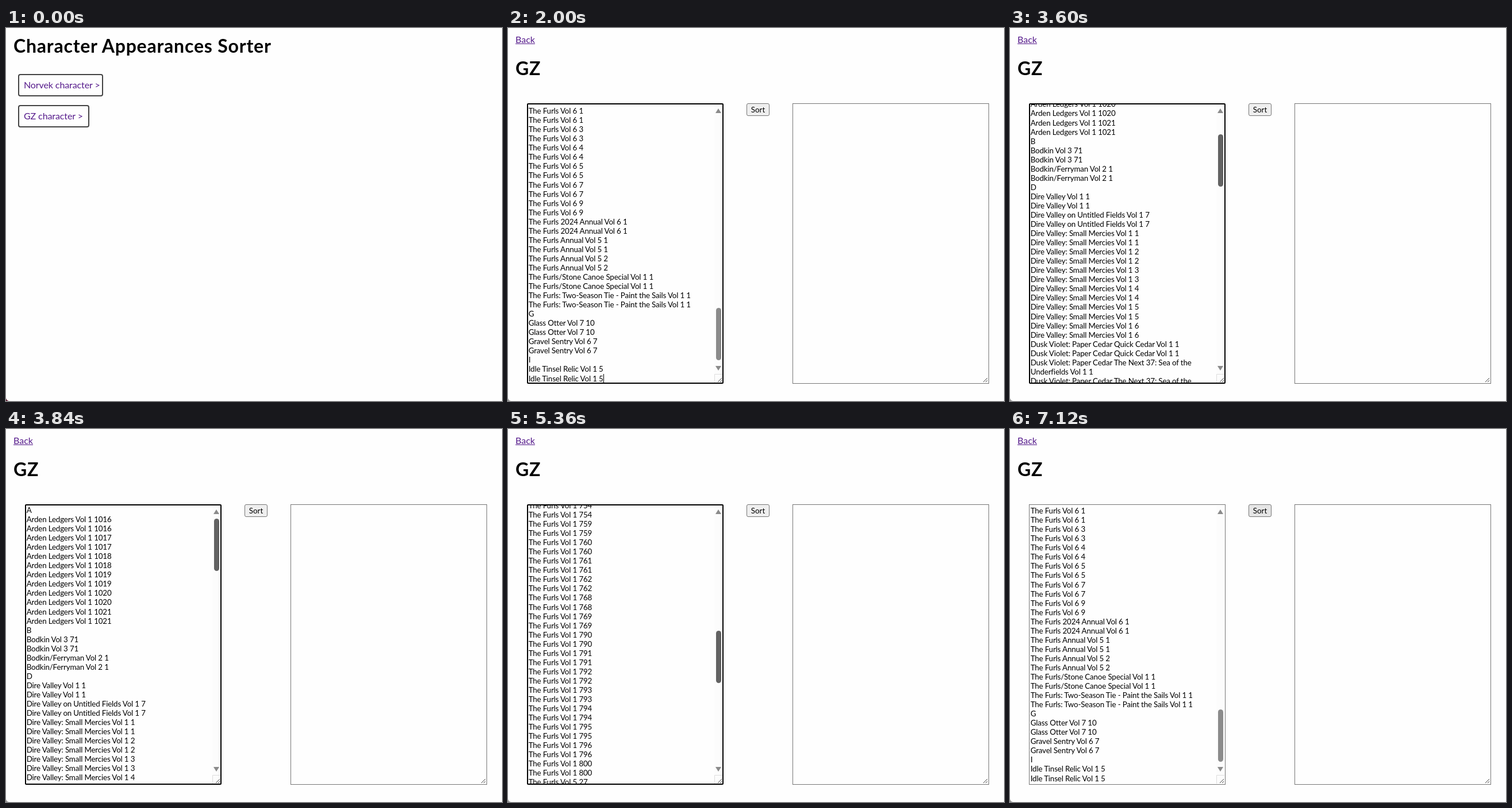
Write an HTML page that moves like this. It is 863 by 649 pixels and loops after 8 s.

```html
<!DOCTYPE html>
<html lang="en">
<head>
<meta charset="utf-8">
<title>Character Appearances Sorter</title>
<style>
  html, body { margin: 0; width: 100%; height: 100%; overflow: hidden; background: #fefefe; }
  body { position: relative; font: 16px Lato, sans-serif; color: #000; }
  div, h1, svg { position: absolute; box-sizing: border-box; margin: 0; white-space: pre; }
  svg { left: 0; top: 0; }
  h1 { left: 13px; font: bold 32px/40px Lato, sans-serif; letter-spacing: .8px; }
  .link { left: 21px; height: 39px; border: 2px solid #444; border-radius: 4px; padding-left: 8px; line-height: 34px; letter-spacing: -.1px; color: #551a8b; }
  .area { top: 131px; width: 342px; height: 488px; border: 1px solid #767676; }
  #left.focus { border: 2px solid #000; border-radius: 2px; }
  #clip { left: 35px; top: 133px; width: 324px; height: 484px; overflow: hidden; }
  #text { left: .7px; top: 0; font-size: 13.33px; line-height: 16.04px; letter-spacing: -.15px; }
  #caret { display: inline-block; width: 1px; height: 16px; margin-right: -1px; vertical-align: top; background: #000; }
  #sort { left: 415px; top: 131px; width: 40px; height: 22px; border: 1px solid #767676; border-radius: 3px; font-size: 13.33px; line-height: 20px; text-align: center; }
  #bar { left: 359px; top: 133px; width: 14px; height: 484px; background: #fcfcfc; }
  #thumb { left: 3px; width: 9px; height: 91px; border-radius: 4.5px; }
  #corner { left: 0; bottom: 0; width: 6px; height: 6px; }
</style>
</head>
<body>
<div id="home">
  <h1 style="top:11px">Character Appearances Sorter</h1>
  <div class="link" style="top:80px;width:148px">Norvek character &gt;</div>
  <div class="link" id="pick" style="top:134px;width:124px">GZ character &gt;</div>
</div>
<div id="page">
  <div style="left:13px;top:10px;line-height:20px;color:#551a8b;text-decoration:underline">Back</div>
  <h1 style="top:50px">GZ</h1>
  <div class="area" id="left" style="left:33px"></div>
  <div class="area" style="left:495px"></div>
  <div id="clip"><div id="text"></div></div>
  <div id="bar">
    <svg width="14" height="484" fill="#8b8b8b"><path d="M7 7l5 8H2zM7 463l5-8H2z"/><path d="M.5 484V469.500H14" fill="none" stroke="#ddd"/></svg>
    <div id="thumb"></div>
  </div>
  <svg width="863" height="649" fill="none" stroke="#444"><path id="grip" d="M365 616l7-7m-3 7l3-3"/><path d="M827 616l7-7m-3 7l3-3"/></svg>
  <div id="sort">Sort</div>
</div>
<div id="corner"></div>
<script>
const $ = id => document.getElementById(id);
const twice = s => [s, s];
const issues = (title, nums) => nums.split(' ').flatMap(n => twice(`${title} ${n}`));
const lines = [
  'A', ...issues('Arden Ledgers Vol 1', '1016 1017 1018 1019 1020 1021'),
  'B', ...issues('Bodkin Vol 3', '71'), ...issues('Bodkin/Ferryman Vol 2', '1'),
  'D', ...issues('Dire Valley Vol 1', '1'), ...issues('Dire Valley on Untitled Fields Vol 1', '7'),
  ...issues('Dire Valley: Small Mercies Vol 1', '1 2 3 4 5 6'),
  ...issues('Dusk Violet: Paper Cedar Quick Cedar Vol 1', '1'),
  ...issues('Dusk Violet: Paper Cedar The Next 37: Sea of the\nUnderfields Vol 1', '1'),
  ...issues('Dusk Violet: Paper Cedar The Next Legends of the GZ\nProvince Vol 1', '1'),
  ...twice('GZ Quarto Compendiums: New Edition'),
  ...issues('GZ Clockmaker Winter Vol 1', '1'),
  ...issues('GZ Tides: A Remembrance Vol 1', '1'),
  ...issues('GZ Bells: Lon Pavic Special Vol 1', '1'),
  ...twice("GZ's Quick Relay Vol 1 2 (Digital)"),
  ...issues('Dusk J for Jory Vol 1', '11'),
  'F', ...issues('FMQP Dire Valley Special Edition Vol 1', '0'),
  ...issues('The Furls Vol 1', '750 752 754 759 760 761 762 768 769 790 791 792 793 794 795 796 800'),
  ...issues('The Furls Vol 5', '27 50 51 57 70 71 74 81'),
  ...issues('The Furls Vol 6', '1 3 4 5 7 9'),
  ...issues('The Furls 2024 Annual Vol 6', '1'), ...issues('The Furls Annual Vol 5', '1 2'),
  ...issues('The Furls/Stone Canoe Special Vol 1', '1'),
  ...issues('The Furls: Two-Season Tie - Paint the Sails Vol 1', '1'),
  'G', ...issues('Glass Otter Vol 7', '10'), ...issues('Gravel Sentry Vol 6', '7'),
  'I', ...issues('Idle Tinsel Relic Vol 1', '5')
].join('\n');

// [time, scroll offset]
const scrollKeys = [[3040, 1762], [3120, 1600], [3280, 720], [3360, 500], [3600, 153], [3840, 0],
  [4880, 0], [4960, 217], [5360, 1035], [5680, 1764]];

function scrollAt(t) {
  const i = scrollKeys.findIndex(k => k[0] > t);
  if (i < 0) return scrollKeys.at(-1)[1];
  if (!i) return scrollKeys[0][1];
  const [t0, a] = scrollKeys[i - 1], [t1, b] = scrollKeys[i];
  return Math.round(a + (b - a) * (t - t0) / (t1 - t0));
}

const show = (el, on) => el.style.visibility = on ? 'inherit' : 'hidden';
const within = (t, a, b) => t >= a && t < b;
let pasted;

function draw(now) {
  const t = Math.floor(now % 8000 / 80) * 80;
  const filled = t >= 2000, focus = within(t, 1520, 6960);
  show($('home'), t < 960);
  show($('page'), t >= 960);
  $('pick').style.color = within(t, 640, 720) ? '#e00' : '#551a8b';
  $('corner').style.background = `radial-gradient(circle at 100% 0, transparent 5.5px, ${t < 800 ? '#5a1a30' : '#999'} 6.5px)`;

  if (pasted !== filled) {
    $('text').textContent = filled ? lines : '';
    $('text').insertAdjacentHTML('beforeend', '<span id="caret"></span>');
    pasted = filled;
  }
  const y = filled ? scrollAt(t) : 0;
  $('text').style.transform = `translateY(${-y}px)`;
  show($('caret'), focus && !within(t, 2480, 2880) && !within(t, 5440, 6000) && t < 6480);

  $('left').classList.toggle('focus', focus);
  show($('bar'), filled);
  $('thumb').style.top = 23 + y / 5.32 + 'px';
  $('thumb').style.background = within(t, 2480, 6080) ? '#636363' : '#8b8b8b';
  $('sort').style.background = t < 6720 ? '#efefef' : within(t, 6960, 7120) ? '#f5f5f5' : '#e5e5e5';
  requestAnimationFrame(draw);
}
requestAnimationFrame(draw);
</script>
</body>
</html>
```
